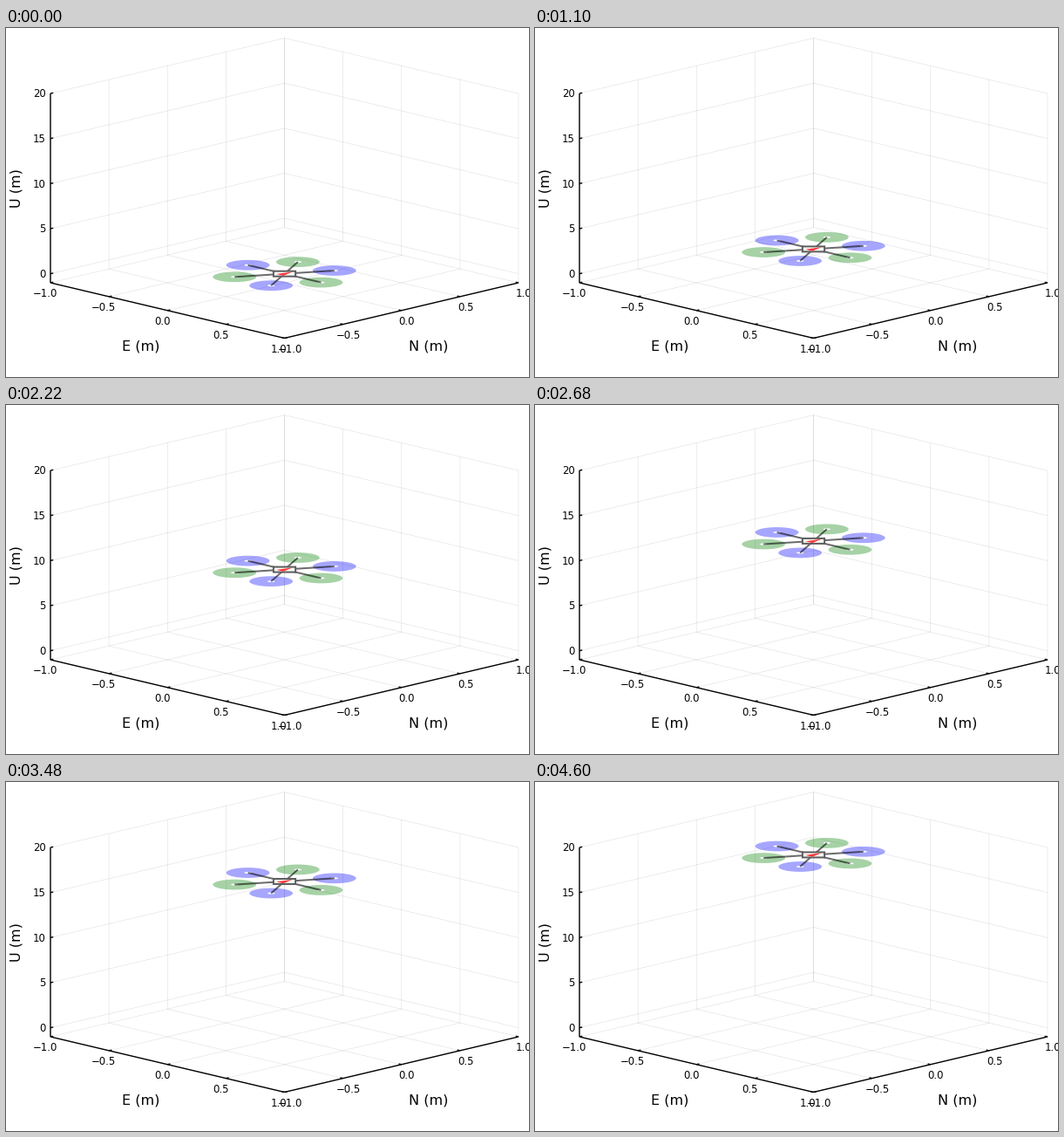
A matplotlib script that plays this animation: 600x400 px, repeating every 4.7 s.

```python
import numpy as np
import matplotlib.pyplot as plt
from matplotlib.animation import FuncAnimation
from matplotlib.patches import Polygon
from matplotlib.transforms import Affine2D

W, H, DPI = 600, 400, 100
PX = 72 / DPI                      # points per pixel
CX, CY = 319.5, 292.0              # floor centre on screen
SX, SY, SZ = 134.25, 31.75, 10.33  # pixels per metre
TICK_LEN = 0.024

STEP_MS, LOOP_MS = 20, 4700
LAST_POSE = 98
CLIMB = 198.2                      # total rise in pixels

plt.rcParams["font.family"] = "DejaVu Sans"
fig = plt.figure(figsize=(W / DPI, H / DPI), dpi=DPI, facecolor="white")
ax = fig.add_axes([0, 0, 1, 1])
ax.set_xlim(0, W)
ax.set_ylim(H, 0)
ax.axis("off")


def project(e, n, u):
    """East, north, up in metres to screen pixels."""
    return CX + SX * (e + n), CY + SY * (e - n) - SZ * (u + 1)


def segment(a, b, width, **style):
    (x0, y0), (x1, y1) = project(*a), project(*b)
    ax.plot([x0, x1], [y0, y1], lw=width * PX, solid_capstyle="butt",
            snap=False, **style)


def label(x, y, text, size, **style):
    ax.text(x, y, text, fontsize=size * PX, color="black",
            va="baseline", **style)


def draw_grid():
    style = dict(color="black", alpha=0.1, zorder=1)
    for v in np.linspace(-1, 1, 5):
        segment((v, -1, -1), (v, 1, -1), 0.7, **style)
        segment((-1, v, -1), (1, v, -1), 0.7, **style)
        segment((-1, v, -1), (-1, v, 20), 0.7, **style)
        segment((v, 1, -1), (v, 1, 20), 0.7, **style)
    for u in range(0, 21, 5):
        segment((-1, -1, u), (-1, 1, u), 0.7, **style)
        segment((-1, 1, u), (1, 1, u), 0.7, **style)


def draw_axes():
    style = dict(color="black", zorder=2)
    segment((-1, -1, -1), (-1, -1, 20), 1.4, **style)
    segment((-1, -1, -1), (1, -1, -1), 1.4, **style)
    segment((1, -1, -1), (1, 1, -1), 1.4, **style)

    for v in np.linspace(-1, 1, 5):
        text = f"{v:.1f}".replace("-", "\u2212")
        segment((v, -1, -1), (v, -1 + TICK_LEN, -1), 1.4, **style)
        x, y = project(v, -1, -1)
        label(x - 6.2, y + 16.5, text, 11.6, ha="center")
        segment((1, v, -1), (1 - TICK_LEN, v, -1), 1.4, **style)
        x, y = project(1, v, -1)
        label(x + 6.2, y + 16.5, text, 11.6, ha="center")

    for u in range(0, 21, 5):
        segment((-1, -1, u), (-1, -1 + TICK_LEN, u), 1.4, **style)
        x, y = project(-1, -1, u)
        label(x - 5.2, y + 4.4, str(u), 11.6, ha="right")

    label(154.5, 369.2, "E (m)", 16, ha="center")
    label(484.5, 369.2, "N (m)", 16, ha="center")
    label(16.8, 184, "U (m)", 16, ha="center", rotation=90,
          rotation_mode="anchor")


def draw_drone(lift):
    moving = lift + ax.transData

    def shape(e, n, **style):
        points = np.column_stack(project(np.asarray(e), np.asarray(n), 0))
        ax.add_patch(Polygon(points, closed=True, transform=moving,
                             snap=False, **style))

    turn = np.linspace(0, 2 * np.pi, 80, endpoint=False)
    circle_e, circle_n = np.cos(turn), np.sin(turn)
    for i in range(6):
        angle = i * np.pi / 3
        e, n = 0.3125 * np.cos(angle), 0.3125 * np.sin(angle)
        color = "blue" if i % 2 else "green"
        for radius, fill, alpha in ((0.131, color, 0.35), (0.022, "white", 1)):
            shape(e + radius * circle_e, n + radius * circle_n,
                  fc=fill, ec="none", alpha=alpha, zorder=3)
        segment((0, 0, 0), (e, n, 0), 2, color="black", alpha=0.58,
                transform=moving, zorder=4)

    arm = 0.094
    shape([arm, 0, -arm, 0], [0, arm, 0, -arm], fc="white",
          ec="#5c5c5c", lw=2 * PX, joinstyle="miter", zorder=5)
    shape([0, 0.03, -0.03], [0.07, -0.04, -0.04], fc="#ff3333",
          ec="none", zorder=6)


def pose_at(tick):
    """Poses come in threes: two short holds, then a long one."""
    triple, rest = divmod(tick + 1, 7)
    return min(3 * triple + min(rest, 2) - 1, LAST_POSE)


def rise(pose):
    s = pose / LAST_POSE
    ease = s * s * (3 - 2 * s)
    return CLIMB * (ease + 0.035 * s * (1 - s) * (1 - 2 * s))


lift = Affine2D()
draw_grid()
draw_axes()
draw_drone(lift)


def update(tick):
    lift.clear().translate(0, -rise(pose_at(tick)))
    return []


anim = FuncAnimation(fig, update, frames=LOOP_MS // STEP_MS,
                     interval=STEP_MS, repeat=True, repeat_delay=0,
                     blit=False)
plt.show()
```
